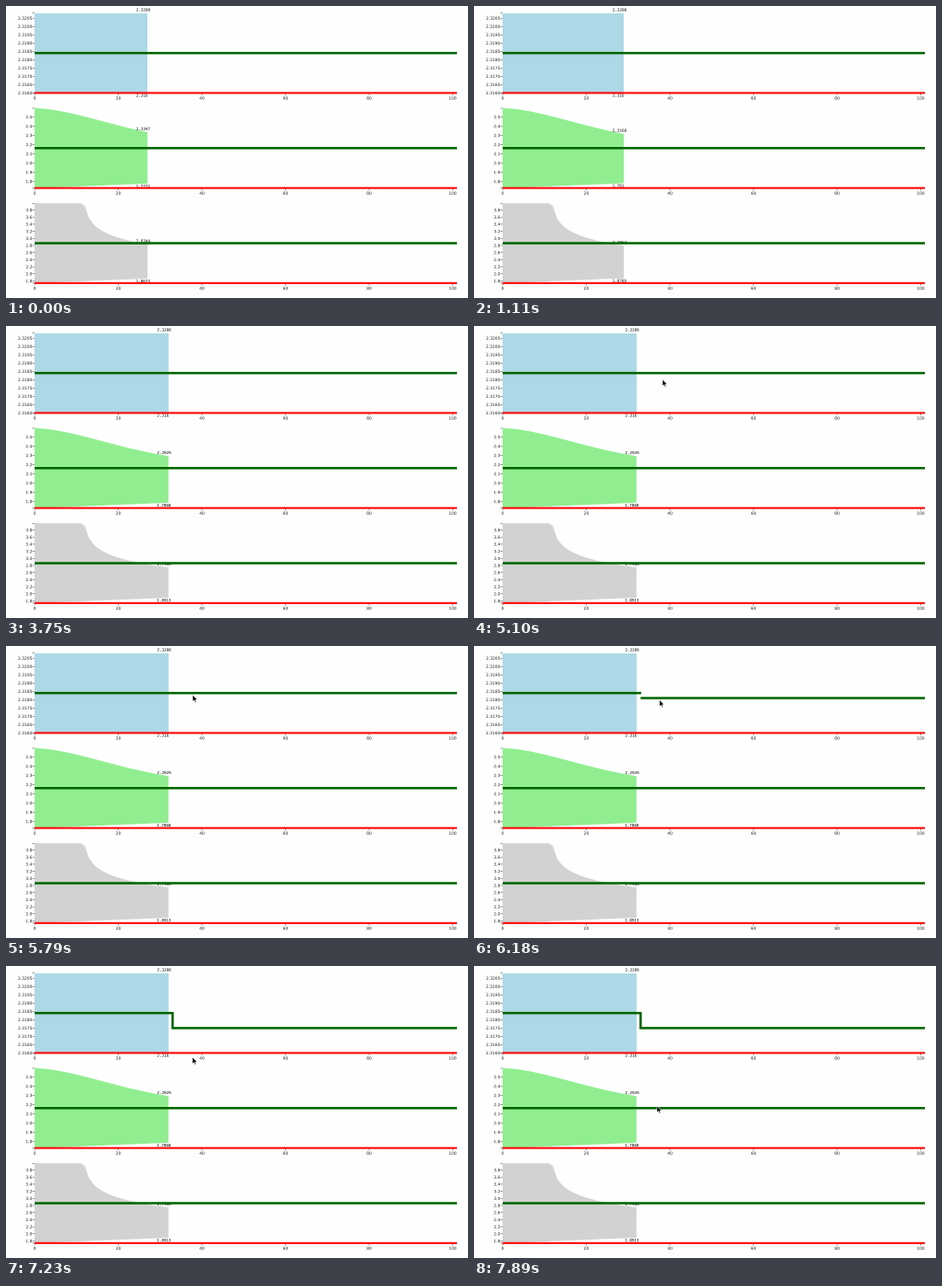
Write a matplotlib script that moves like this. It is 500x317 px and loops after 8 s.

```python
import numpy as np
import matplotlib.pyplot as plt
from matplotlib.animation import FuncAnimation
from matplotlib.collections import LineCollection
from matplotlib.patches import PathPatch, Polygon
from matplotlib.path import Path
from matplotlib.textpath import TextPath

W, H, DPI = 500, 317, 100
LOOP, INTERVAL, TICK = 8000, 20, 30
PX = 72 / DPI  # points per pixel
LEFT, UNIT = 31, 4.525
RIGHT = LEFT + 101 * UNIT
SPLIT_X = LEFT + 33 * UNIT
TOP, HEIGHT, PITCH = 7.8, 86.6, 103.2
SANS, MONO = ("DejaVu Sans", 4.4), ("DejaVu Sans Mono", 4.2)
SETTLE, GRAB, DROP, RELEASE, LEAVE = 5100, 6030, 6540, 6780, 7890

fig = plt.figure(figsize=(W / DPI, H / DPI), dpi=DPI, facecolor="#fefefe")
ax = fig.add_axes([0, 0, 1, 1])
ax.set(xlim=(0, W), ylim=(H, 0))
ax.axis("off")


def x_at(step):
    return LEFT + UNIT * step


def progress(t, start, end):
    return np.clip((t - start) / (end - start), 0, 1)


def smooth(p):
    return p * p * (3 - 2 * p)


def glyphs(x, y, text, font, align):
    """Outline of text centred on y; align 0 is left, 0.5 centre, 1 right."""
    family, size = font
    path = TextPath((0, 0), text, size=size, prop={"family": family})
    box = path.get_extents()
    anchor = (box.x0 + align * box.width, (box.y0 + box.y1) / 2)
    return Path((path.vertices - anchor) * (1, -1) + (x, y), path.codes)


def label(x, y, text, font=SANS, align=0.5, color="#222"):
    patch = PathPatch(glyphs(x, y, text, font, align), fc=color, lw=0, zorder=2)
    return ax.add_patch(patch)


def rule(y, color, width):
    return ax.plot([LEFT, RIGHT], [y, y], color=color, lw=width * PX, zorder=4, snap=False,
                   solid_capstyle="butt", solid_joinstyle="miter")[0]


class Panel:
    """Area between an upper and a lower bound, with axes and two rules."""

    def __init__(self, row, color, domain, step, fmt, upper, lower):
        self.lo, self.hi = domain
        self.upper, self.lower = upper, lower
        self.top = TOP + row * PITCH
        self.floor = self.top + HEIGHT
        self.middle = self.top + HEIGHT / 2
        self.area = ax.add_patch(Polygon([(0, 0)] * 3, color=color, lw=0, zorder=1))

        first, last = (round(v / step, 6) for v in domain)
        values = np.arange(np.ceil(first), np.floor(last) + 1) * step
        marks = [[(28.5, y), (LEFT, y)] for y in (self.top, self.floor, *self.y_at(values))]
        for v in values:
            label(28, self.y_at(v), fmt % v, align=1)
        for v in range(0, 101, 20):
            marks.append([(x_at(v), self.floor), (x_at(v), self.floor + 2.7)])
            label(x_at(v), self.floor + 5.6, str(v))
        ax.add_collection(LineCollection(marks, colors="#333", linewidths=0.5 * PX,
                                         snap=False, zorder=0))

        self.high, self.low = (label(0, 0, "0", MONO, color="black") for _ in range(2))
        rule(self.floor, "#ff0000", 2)
        self.goal = rule(self.middle, "#006400", 2.5)

    def y_at(self, value):
        return self.top + (self.hi - value) / (self.hi - self.lo) * HEIGHT

    def show(self, count):
        steps = np.arange(count + 1.0)
        xs = x_at(steps)
        bounds = np.clip([self.upper(steps), self.lower(steps)], self.lo, self.hi)
        high, low = self.y_at(bounds)
        self.area.set_xy(np.vstack([np.c_[xs, high], np.c_[xs, low][::-1]]))
        for patch, value, shift in zip((self.high, self.low), bounds[:, -1], (-3.7, 2.7)):
            patch.set_path(glyphs(xs[-1] - 12, self.y_at(value) + shift,
                                  f"{round(value, 4):g}", MONO, 0))


panels = [
    Panel(0, "#add8e6", (2.316, 2.3208), 0.0005, "%.4f",
          lambda n: 2.3208 + 0 * n,
          lambda n: 2.316 + 0 * n),
    Panel(1, "#90ee90", (1.729, 2.595), 0.1, "%.1f",
          lambda n: 2.2 + 0.395 * np.exp(-(n / 25.9) ** 1.75),
          lambda n: 1.7868 + 0.00192 * (n - 32)),
    Panel(2, "#d2d2d2", (1.74, 3.99), 0.2, "%.1f",
          lambda n: 3.695 - 0.314 * np.log(np.maximum(n - 11.5, 0.01)),
          lambda n: 1.8913 + 0.0048 * (n - 32)),
]
goal_y = panels[0].middle
goal_left = panels[0].goal
goal_right = rule(goal_y, "#006400", 2.5)

ARROW = np.array([(0, 0), (0, 7.2), (1.7, 5.8), (2.8, 8.4), (3.9, 7.9), (2.8, 5.4), (5, 5.2)])
cursor = ax.add_patch(Polygon(ARROW, fc="black", ec="white", lw=0.5 * PX, zorder=6))


def pointer(t, drag):
    """Tip: rises from below, settles on the rule, drags it, then leaves downwards."""
    rest = (1 - progress(t, 4440, SETTLE)) ** 2
    settle = smooth(progress(t, SETTLE, 5820))
    leave = progress(t, RELEASE, LEAVE)
    x = 204 + 8 * rest - 2 * settle - 4 * progress(t, GRAB, DROP) + 4 * np.sin(np.pi * leave)
    y = 58 + 262 * rest - 5 * settle + drag + 82.5 * smooth(leave)
    return x, y


def update(frame):
    middle = (frame + 0.5) * INTERVAL
    t = middle // TICK * TICK
    count = 27 + int(np.clip((t - 240) // 870 + 1, 0, 5))
    for panel in panels:
        panel.show(count)

    drag = 16.3 * progress(t, GRAB - TICK, DROP)
    y = goal_y + drag
    dragging = GRAB <= t < RELEASE
    if dragging:
        goal_left.set_data([LEFT, SPLIT_X + 0.6], [goal_y, goal_y])
        goal_right.set_data([SPLIT_X, RIGHT], [y, y])
    else:
        goal_left.set_data([LEFT, SPLIT_X, SPLIT_X, RIGHT], [goal_y, goal_y, y, y])
    goal_right.set_visible(dragging)

    cursor.set_visible(t >= 4470)
    cursor.set_xy(ARROW + pointer(t, drag))
    return []


anim = FuncAnimation(fig, update, frames=LOOP // INTERVAL, interval=INTERVAL,
                     repeat=True, repeat_delay=0)
plt.show()
```
